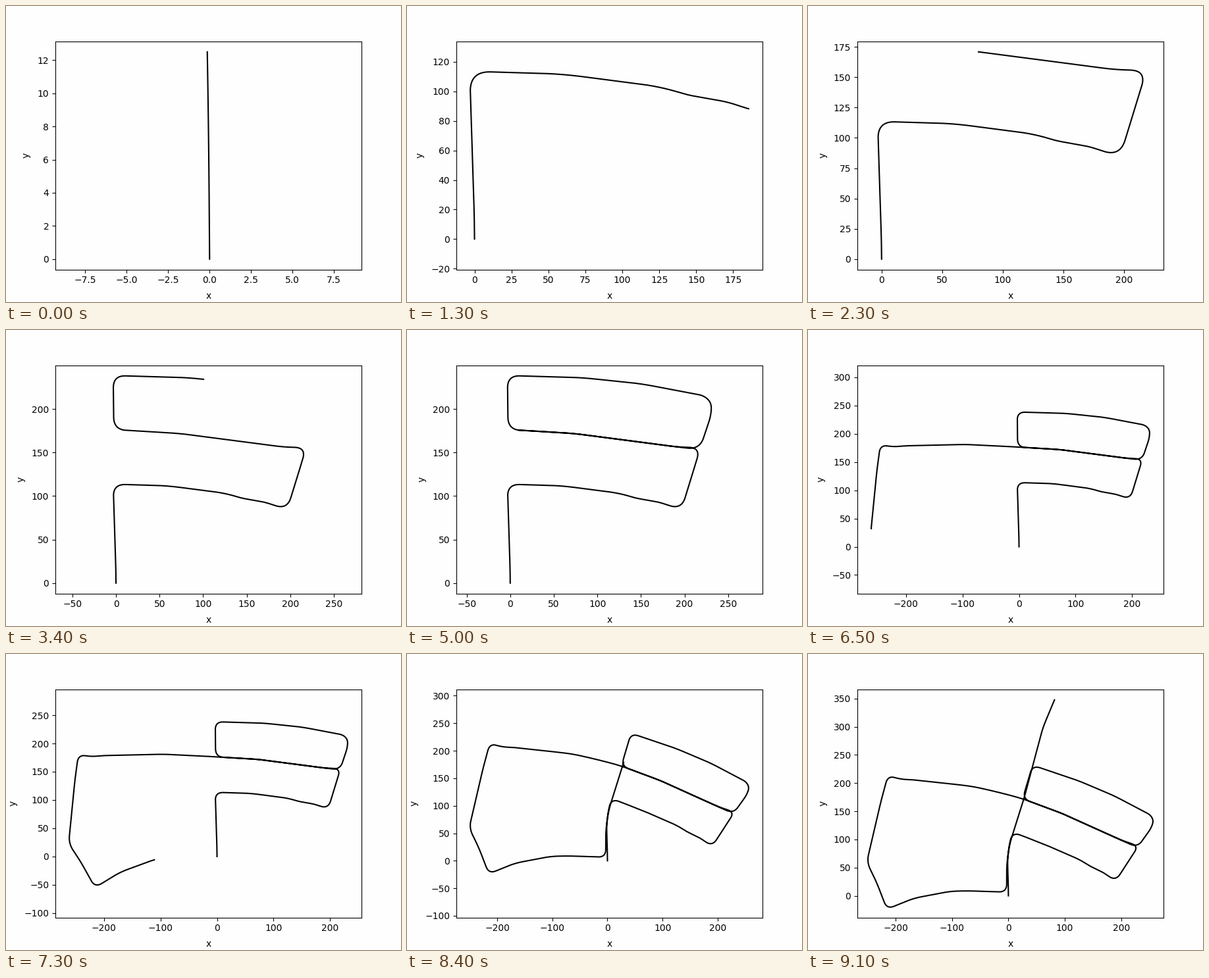
Animation of 600x450 px, one loop 9200 ms. Source, as a matplotlib script:

```python
import numpy as np
import matplotlib.pyplot as plt
from matplotlib.animation import FuncAnimation

FRAMES, INTERVAL = 92, 100
CLOSURE_FRAME = 82
STEP = 0.5            # spacing of the samples along the route
CORNER_RADIUS = 14
PAPER = "#fefefe"

# The street corners and bends of the drive, as complex x + iy.
ROAD = [196 + 155.8j, 74 + 171.8j]  # driven twice
LOWER_BLOCK = [0, 11j, -3.3 + 113.6j, 59 + 111.8j, 127 + 103j, 152 + 95j,
               163 + 95.5j, 196.5 + 84.5j, 218.5 + 156j]
UPPER_BLOCK = [-2.5 + 176.3j, -3.2 + 238.4j, 82 + 236j, 150 + 229j,
               229.5 + 214j, 232.5 + 199j, 217.5 + 153.5j]
WEST = [176.3j, -93 + 181j, -206 + 178.5j, -222 + 176j, -245 + 181j,
        -251 + 137j, -262.3 + 23j, -241 - 9j, -215.6 - 55j, -172 - 28j]
HOME = [-110 - 5j, -79 + 1j, -11 + 10j, -19 + 58j, -20 + 95j, -8 + 180j,
        4 + 308j, 16.5 + 361.5j]

# Heading correction in degrees by distance driven, once the loop is closed.
DRIFT = {50: 0, 110: -18, 150: -20, 200: -16, 400: -16, 500: -17, 1180: -17,
         1215: -12, 1320: -7.5, 1650: -7.5, 1700: -9.5}
# Distance driven by frame.
PROGRESS = {0: 12.5, 34: 780, 50: 1183, 73: 1805, 91: 2260}


def ramp(x, keys):
    return np.interp(x, list(keys), list(keys.values()))


def drive(corners):
    """Sample the polyline evenly and round its corners by a moving average."""
    corners = np.array(corners)
    arc = np.concatenate([[0], np.cumsum(abs(np.diff(corners)))])
    distance = np.arange(0, arc[-1], STEP)
    line = np.interp(distance, arc, corners)
    half = int(CORNER_RADIUS / STEP)
    padded = np.pad(line, half, mode="reflect", reflect_type="odd")
    kernel = np.ones(2 * half + 1) / (2 * half + 1)
    return distance, np.convolve(padded, kernel, mode="valid")


def correct(distance, path):
    """Turn every step of the path by the heading correction."""
    turn = np.exp(1j * np.radians(ramp(distance[1:], DRIFT)))
    return np.concatenate([[path[0]], path[0] + np.cumsum(np.diff(path) * turn)])


distance, estimate = drive(LOWER_BLOCK + ROAD + UPPER_BLOCK + ROAD + WEST + HOME)
corrected = correct(distance, estimate)

fig, ax = plt.subplots(figsize=(6, 4.5), dpi=100, facecolor=PAPER)


def draw(frame):
    path = estimate if frame < CLOSURE_FRAME else corrected
    path = path[distance <= ramp(frame, PROGRESS)]
    ax.clear()
    ax.set_facecolor(PAPER)
    ax.plot(path.real, path.imag, color="black", lw=1.5)
    ax.axis("equal")
    ax.set_xlabel("x", labelpad=7)
    ax.set_ylabel("y", labelpad=7)
    return ax.lines


anim = FuncAnimation(fig, draw, frames=FRAMES, interval=INTERVAL,
                     repeat=True, repeat_delay=0)
plt.show()
```
